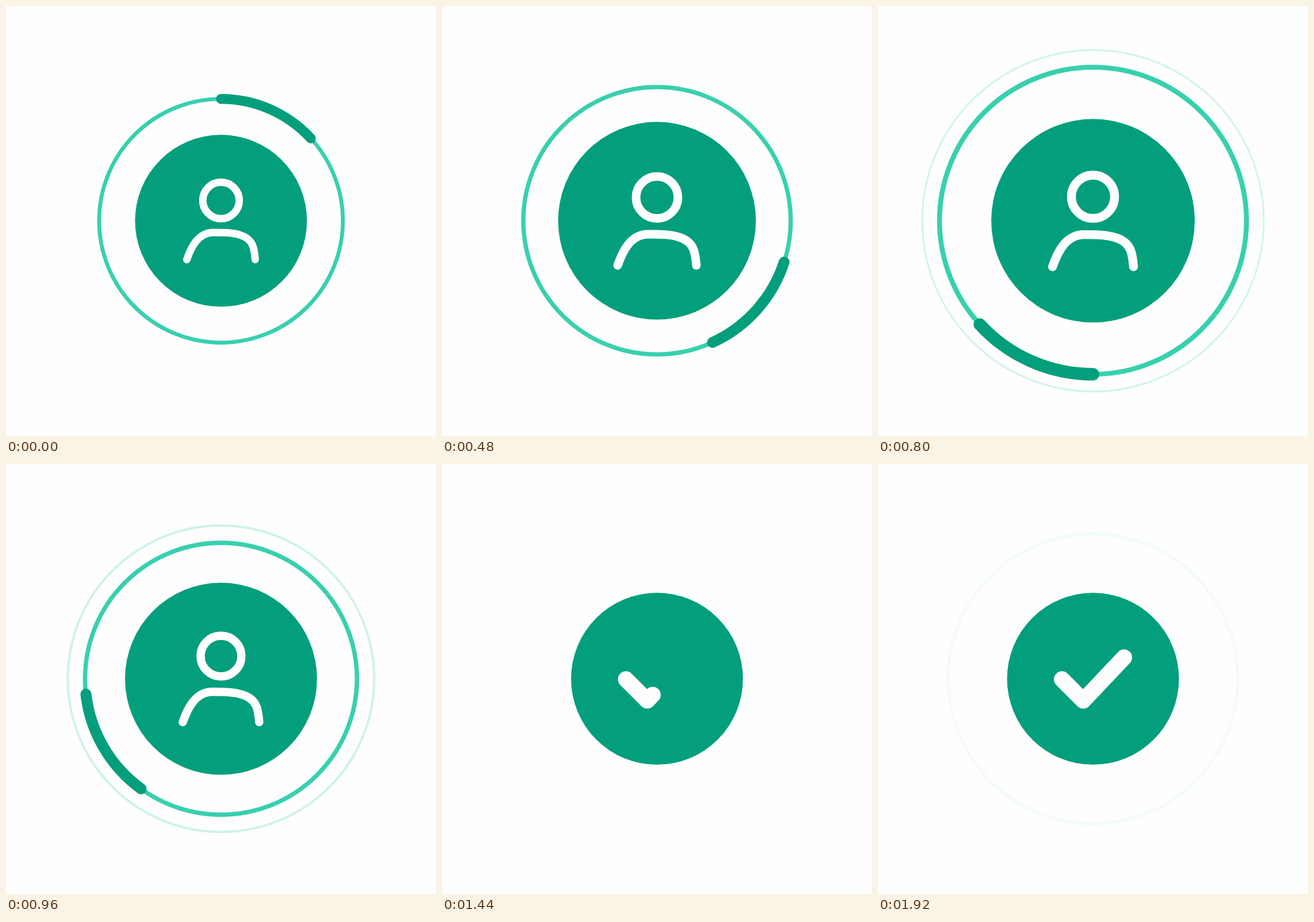
Recreate the animation shown at these times as an HTML page with a canvas. Size 748 px wide and 748 px high, loop 2160 ms.

```html
<!DOCTYPE html>
<html lang="en">
<head>
<meta charset="utf-8">
<title>Verification loader</title>
<style>
  html, body { margin: 0; width: 100%; height: 100%; overflow: hidden; background: #fefefe; }
  canvas { display: block; }
</style>
</head>
<body>
<canvas id="stage" width="748" height="748"></canvas>
<script>
const ctx = document.getElementById('stage').getContext('2d');
const GREEN = '#039f7c', MINT = '#38d0ae', WHITE = '#fefefe';
const LOOP = 2160, STEP = 80, LAST = 1920, PEAK = 800;
const DISC = 149.5;
const shoulders = new Path2D('M-59.5 67.5C-52 46 -40 20.3 -13 20.3C5 20.3 20 20.3 34 25C56 32 58 48 59.5 67.5');

// Linear interpolation through [time, value] pairs, held at both ends.
function track(t, keys) {
  const i = keys.findIndex(k => k[0] > t);
  if (i === 0) return keys[0][1];
  if (i < 0) return keys[keys.length - 1][1];
  const [t0, a] = keys[i - 1], [t1, b] = keys[i];
  return a + (b - a) * (t - t0) / (t1 - t0);
}

function pen(color, width, alpha = 1) {
  ctx.strokeStyle = color;
  ctx.lineWidth = width;
  ctx.globalAlpha = alpha;
}

function arc(r, from = 0, to = 360, x = 0, y = 0) {
  const rad = a => (a - 90) * Math.PI / 180;
  ctx.beginPath();
  ctx.arc(x, y, r, rad(from), rad(to));
}

function ring(r, color, width, alpha) {
  if (alpha <= 0) return;
  pen(color, width, alpha);
  arc(r);
  ctx.stroke();
}

const orbitRadius = t => t < PEAK
  ? 212 + 35.5 * (t / 640) ** 1.9
  : 267 - 87.5 * ((t - PEAK) / 400) ** 1.15;

function drawOrbit(t, discRadius) {
  const r = orbitRadius(t);
  if (!(r > discRadius - 10)) return;
  const halo = track(t, [[480, 0], [560, .1], [640, .2], [960, .25], [1200, 0]]);
  ring(r + 30, MINT, track(t, [[640, 2.2], [960, 4]]), halo);
  ring(r, MINT, r * .032, 1);
  const start = t * .225;
  pen(GREEN, r * .081);
  arc(r, start, start + 47.5);
  ctx.stroke();
}

function drawPerson(scale, alpha) {
  if (alpha <= 0) return;
  ctx.save();
  ctx.scale(scale, scale);
  pen(WHITE, 13, alpha);
  arc(31.7, 0, 360, 0, -35.3);
  ctx.stroke();
  ctx.stroke(shoulders);
  ctx.restore();
}

function drawCheck(p) {
  if (p <= 0) return;
  const pts = [[-54, 1], [-17, 38], [54, -37]], split = .34;
  const mix = (a, b, k) => [a[0] + (b[0] - a[0]) * k, a[1] + (b[1] - a[1]) * k];
  pen(WHITE, 28);
  ctx.beginPath();
  ctx.moveTo(...pts[0]);
  ctx.lineTo(...mix(pts[0], pts[1], Math.min(1, p / split)));
  if (p > split) ctx.lineTo(...mix(pts[1], pts[2], (p - split) / (1 - split)));
  ctx.stroke();
}

function draw(t) {
  const r = track(t, [[0, DISC], [640, 179.5], [720, 182], [960, 167], [1200, 153], [1280, DISC]]);
  ctx.setTransform(1, 0, 0, 1, 0, 0);
  ctx.globalAlpha = 1;
  ctx.fillStyle = WHITE;
  ctx.fillRect(0, 0, 748, 748);
  ctx.translate(374, 373.6);
  ctx.lineCap = ctx.lineJoin = 'round';

  drawOrbit(t, r);
  if (t > 1440) {
    ring(199 + (t - 1680) * .221, MINT, 6, track(t, [[1440, .45], [1680, .27], [1920, .05]]));
  }
  ctx.globalAlpha = 1;
  ctx.fillStyle = GREEN;
  arc(r);
  ctx.fill();
  drawPerson(r / DISC, track(t, [[1180, 1], [1200, .9], [1360, 0]]));
  drawCheck(track(t, [[1320, 0], [1600, 1]]));
}

const begin = performance.now();
function tick() {
  const t = (performance.now() - begin) % LOOP;
  draw(Math.min(LAST, Math.floor(t / STEP) * STEP));
  requestAnimationFrame(tick);
}
tick();
</script>
</body>
</html>
```
